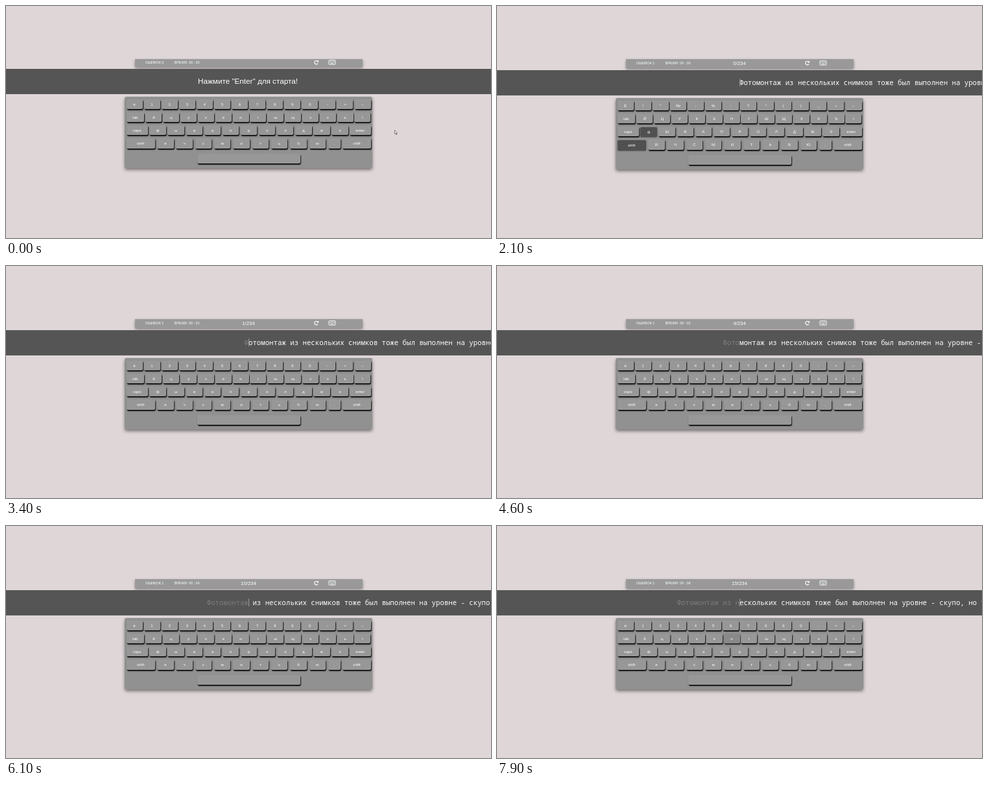
These frames come from a looping animation (748 px wide and 358 px high, 8000 ms). An HTML page:

```html
<!DOCTYPE html>
<html lang="ru">
<head>
<meta charset="utf-8">
<title>Клавиатурный тренажёр</title>
<style>
  html, body { margin: 0; width: 100%; height: 100%; overflow: hidden; background: #dfd6d7; }
  body { position: relative; color: #fff; font-family: "Liberation Sans", Arial, sans-serif; }
  div, span.abs, svg { position: absolute; white-space: pre; }
  #bar { left: 198.5px; top: 82px; width: 351px; height: 11.5px; background: #999;
    box-shadow: 0 2px 4px rgba(0,0,0,.4); font-size: 5.45px; line-height: 11.5px; }
  #bar .abs { top: 0; }
  #count { left: 0; width: 351px; text-align: center; font-size: 7.8px; }
  #band { left: 0; top: 96.5px; width: 748px; height: 39px; overflow: hidden; background: #555; }
  #hint { left: 0; width: 746px; top: 0; text-align: center; font-size: 11.69px; line-height: 37px; }
  .line { top: 0; font: 10.71px/39px "Noto Sans Mono", "DejaVu Sans Mono", monospace; }
  #done { right: 374px; color: #7d7d7d; }
  #rest { left: 374px; }
  #caret { left: 374px; top: 13.5px; width: 1px; height: 12px; background: #999; }
  #board { left: 183px; top: 139.5px; width: 382px; height: 110px; border-radius: 3px;
    background: #919191; box-shadow: 0 3px 5px rgba(0,0,0,.45); }
  .key { height: 15.5px; border-radius: 2px; font-size: 6.23px; line-height: 15.5px; text-align: center; }
  .run #bar { height: 13.5px; line-height: 13px; }
  .run #bar svg { margin-top: 1px; }
  .run #band, .run #board { margin-top: 2px; }
  .run #hint, .run #mouse { display: none; }
  body:not(.run) .typing { display: none; }
</style>
</head>
<body>
<div id="bar">
  <span class="abs" id="errors" style="left:16.3px"></span>
  <span class="abs" style="left:61px">ВРЕМЯ</span>
  <span class="abs" id="time" style="left:83.4px"></span>
  <span class="abs typing" id="count"></span>
  <svg style="left:275px;top:1px" width="9" height="8" viewBox="0 0 9 8">
    <path d="M6.6 2.1A2.8 2.8 0 1 0 6.9 5.6" fill="none" stroke="#fff" stroke-width="1.2"/>
    <path d="M8.1.4V3.6H4.9Z" fill="#fff"/>
  </svg>
  <svg style="left:298px;top:1px" width="12" height="8" viewBox="0 0 12 8" fill="none" stroke="#fff">
    <rect x=".9" y=".6" width="10.2" height="6.6" rx=".8" stroke-width=".9"/>
    <path d="M2.2 2.4H10M2.2 4H10" stroke-width=".9" stroke-dasharray=".9 .8"/>
    <path d="M3.6 5.6H8.4" stroke-width=".8"/>
  </svg>
</div>
<div id="band">
  <div id="hint">Нажмите "Enter" для старта!</div>
  <div class="line typing" id="done"></div>
  <div class="line typing" id="rest"></div>
  <div class="typing" id="caret"></div>
</div>
<div id="board"></div>
<svg id="mouse" style="left:599px;top:191px" width="6" height="9" viewBox="0 0 6 9">
  <path d="M.6.6V6.4L1.9 5.3 2.9 7.6 3.8 7.2 2.8 5H4.5Z" fill="#fff" stroke="#333" stroke-width=".6"/>
</svg>
<script>
const LOOP = 8000, STEP = 100, FADE = 200, BLINK = 475, START = 1000;
const SHIFT_ON = 1700, SHIFT_OFF = 2850, CLOCK = 1800;
const TEXT = 'Фотомонтаж из нескольких снимков тоже был выполнен на уровне - скупо, но точно';

// label, pressed at, released at
const presses = [
  ['enter', 800, 950], ['shift', SHIFT_ON, SHIFT_OFF],
  ['ф', 1900, 2450], ['о', 3720, 3820], ['т', 3880, 3980], ['о', 3970, 4110],
  ['м', 4720, 4840], ['о', 4960, 5080], ['н', 5160, 5280], ['т', 5380, 5500],
  ['а', 5620, 5740], ['ж', 5820, 5940], [' ', 6200, 6340],
  ['и', 6620, 6720], ['з', 6700, 6850], [' ', 6950, 7100], ['н', 7700, 7820]
];
const typed = presses.slice(2);

// labels, first key width, start of the next keys, pitch, key width, last key [x, width]
const rows = [
  ['ё 1 2 3 4 5 6 7 8 9 0 - = ←', 25, 29.6, 27.08, 25],
  ['tab й ц у к е н г ш щ з х ъ \\', 27.5, 32.4, 26.83, 25],
  ['caps ф ы в а п р о л д ж э enter', 33, 38.4, 28.08, 25.5, [346.8, 33]],
  ['shift я ч с м и т ь б ю . shift', 44, 50, 29.32, 25.5, [336, 44]]
];
const plain = '1234567890-=.', shifted = '!"№;%:?*()_+,';

const $ = id => document.getElementById(id);
const keys = [];

function addKey(label, x, y, w) {
  const el = document.createElement('div');
  el.className = 'key';
  el.style.cssText = `left:${x}px;top:${y}px;width:${w}px`;
  $('board').append(el);
  const first = !keys.some(k => k.label === label);
  const i = plain.indexOf(label);
  const upper = label.length > 1 ? label : i < 0 ? label.toUpperCase() : shifted[i];
  keys.push({ el, label, upper, hits: first ? presses.filter(p => p[0] === label) : [] });
}

rows.forEach(([labels, firstW, start, pitch, w, last], r) => {
  const list = labels.split(' ');
  list.forEach((label, i) => {
    let x = i ? start + (i - 1) * pitch : 2.5;
    let width = i ? w : firstW;
    if (last && i === list.length - 1) [x, width] = last;
    if (label === '.') [x, width] = [314, 18.5];
    addKey(label, x, 4 + r * 20.2, width);
  });
});
addKey(' ', 111.5, 88, 159.5);

function level([, down, up], t) {
  const rise = Math.min(1, (Math.min(t, up) - down) / FADE);
  return Math.max(0, rise - Math.max(0, t - up) / FADE);
}

function draw(t) {
  document.body.classList.toggle('run', t >= START);
  const count = typed.filter(p => p[2] <= t).length;
  const since = count ? typed[count - 1][2] : START;
  const sec = Math.max(0, Math.floor((t - CLOCK) / 1000));
  const upper = t > SHIFT_ON && t < SHIFT_OFF;

  $('errors').textContent = 'ОШИБОК ' + (t > SHIFT_ON ? 1 : 0);
  $('time').textContent = '00 : 0' + sec;
  $('count').textContent = count + '/234';
  $('done').textContent = TEXT.slice(0, count);
  $('rest').textContent = TEXT.slice(count);
  $('caret').style.opacity = Math.floor((t - since) / BLINK) % 2 ? 0 : 1;

  for (const { el, label, upper: big, hits } of keys) {
    const v = Math.max(0, ...hits.map(h => level(h, t)));
    const g = Math.round(151 - 71 * v);
    el.textContent = upper ? big : label;
    el.style.background = `rgb(${g},${g},${g})`;
    el.style.boxShadow = `${0.8 * (1 - v)}px ${1.7 - 1.2 * v}px 1.4px rgba(0,0,0,${1 - 0.4 * v})`;
    el.style.transform = `translateY(${v}px)`;
  }
}

const begin = performance.now();
let shown = -1;
function tick() {
  const t = Math.floor((performance.now() - begin) % LOOP / STEP) * STEP;
  if (t !== shown) draw(shown = t);
  requestAnimationFrame(tick);
}
tick();
</script>
</body>
</html>
```
